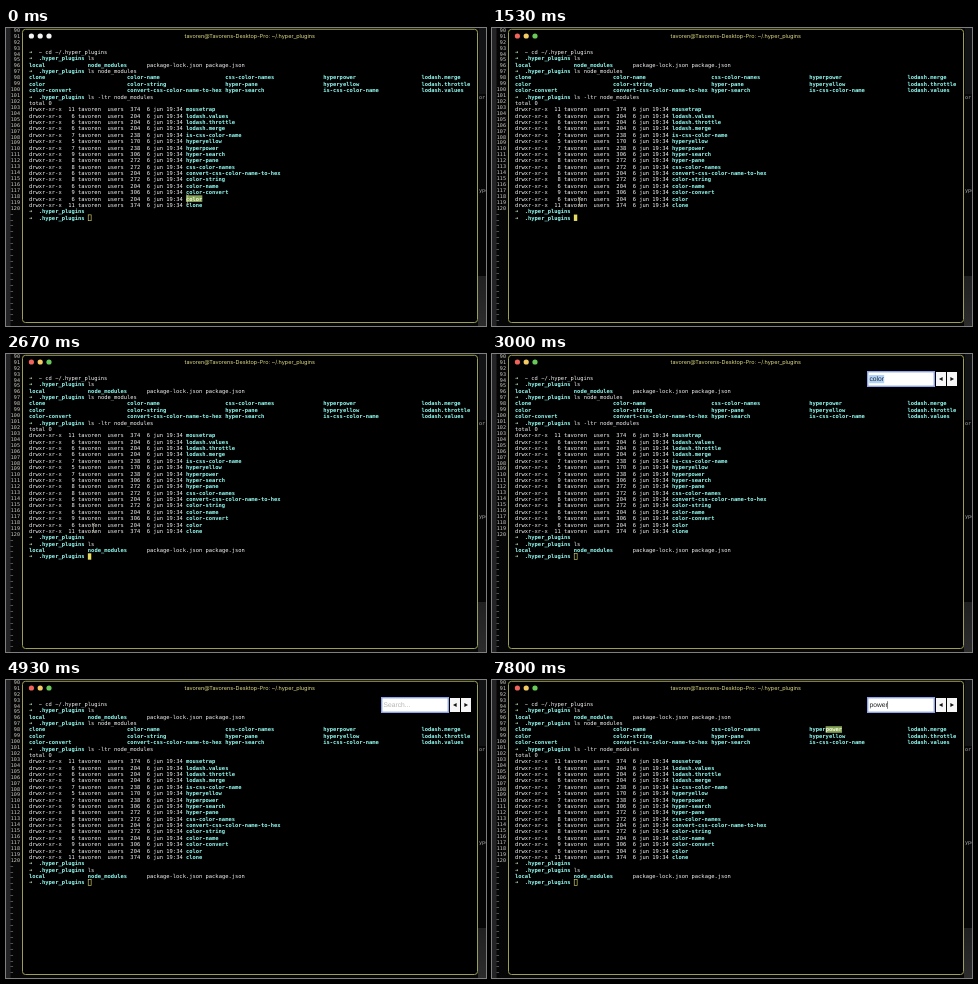
These frames come from a looping animation (480 px wide and 298 px high, 8000 ms). An HTML page with a canvas:

```html
<!DOCTYPE html>
<html lang="en">
<head>
<meta charset="utf-8">
<title>Terminal search</title>
<style>
html, body { margin: 0; width: 100%; height: 100%; overflow: hidden; background: #000; }
canvas { display: block; width: 100vw; height: 100vh; }
</style>
</head>
<body>
<canvas id="stage"></canvas>
<script>
const W = 480, H = 298, LOOP = 8000;
const canvas = document.getElementById('stage');
const ctx = canvas.getContext('2d');

const MONO = '"DejaVu Sans Mono", monospace';
const UI = '"Liberation Sans", Arial, sans-serif';
const TITLE = 'Inter, "Liberation Sans", sans-serif';
const WHITE = '#f4f4f4', CYAN = '#8ffaf0';
const LEFT = 23, TOP = 24, COL = 3.27, ROW = 6.375, SIZE = 5.43;
const USER = 'tavoren', HOST = 'Tavorens-Desktop-Pro', GROUP = 'users';

// Times of the session, in ms
const FOCUS = 600, KEY_L = 2130, KEY_S = 2330, ENTER = 2600, OPEN = 2930, CLEAR = 3390;
const TYPED = [[6870, 'p'], [7330, 'pow'], [7530, 'powe'], [7600, 'power']];
const FOUND = 7800, BLINK = 513;

const modules = [
  ['clone', 'color-name', 'css-color-names', 'hyperpower', 'lodash.merge'],
  ['color', 'color-string', 'hyper-pane', 'hyperyellow', 'lodash.throttle'],
  ['color-convert', 'convert-css-color-name-to-hex', 'hyper-search', 'is-css-color-name', 'lodash.values']
];
const details = [
  [11, 374, 'mousetrap'], [6, 204, 'lodash.values'], [6, 204, 'lodash.throttle'],
  [6, 204, 'lodash.merge'], [7, 238, 'is-css-color-name'], [5, 170, 'hyperyellow'],
  [7, 238, 'hyperpower'], [9, 306, 'hyper-search'], [8, 272, 'hyper-pane'],
  [8, 272, 'css-color-names'], [6, 204, 'convert-css-color-name-to-hex'],
  [8, 272, 'color-string'], [6, 204, 'color-name'], [9, 306, 'color-convert'],
  [6, 204, 'color'], [11, 374, 'clone']
];

const colX = c => LEFT + c * COL;
const rowY = r => TOP + r * ROW;

function rect(x, y, w, h, color) {
  ctx.fillStyle = color;
  ctx.fillRect(x, y, w, h);
}

function text(str, x, y, font, color, align = 'left') {
  ctx.font = font;
  ctx.fillStyle = color;
  ctx.textAlign = align;
  ctx.fillText(str, x, y);
}

// Each word sits on the character grid
function mono(str, col, row, color = WHITE, bold = false) {
  const font = (bold ? 'bold ' : '') + SIZE + 'px ' + MONO;
  for (const m of str.matchAll(/\S+/g)) {
    text(m[0], colX(col + m.index), rowY(row) + 1.9, font, color);
  }
}

function prompt(row, command, dir = '.hyper_plugins') {
  mono('➜', 0, row, '#c4e8ba', true);
  mono(dir, 3, row, dir === '~' ? WHITE : CYAN, dir !== '~');
  mono(command, 4 + dir.length, row);
}

function localFiles(row) {
  mono('local', 0, row, CYAN, true);
  mono('node_modules', 18, row, CYAN, true);
  mono('package-lock.json', 36, row);
  mono('package.json', 54, row);
}

function highlight(str, col, row) {
  rect(colX(col), rowY(row) - 3.3, str.length * COL, 6.6, '#84a254');
  mono(str, col, row, '#f4f8e2', true);
}

function block(col, row, filled) {
  const x = colX(col), y = rowY(row) - 3.2;
  if (filled) return rect(x, y, 3.4, 6.4, '#e6dc62');
  ctx.strokeStyle = '#c3c066';
  ctx.lineWidth = 0.7;
  ctx.strokeRect(x + 0.4, y + 0.3, 2.9, 5.8);
}

function backdrop() {
  rect(0, 0, W, H, '#060606');
  rect(0, 0, 4.5, H, '#242426');
  rect(473, 0, 7, 66, '#121314');
  const shade = ctx.createLinearGradient(0, 248, 0, H);
  shade.addColorStop(0, '#202020');
  shade.addColorStop(1, '#2c2c2c');
  rect(472, 248, 8, 50, shade);
  const font = '5.1px ' + MONO;
  for (let i = 0; i < 50; i++) {
    const y = 3.8 + i * 5.93;
    if (i < 31) text(90 + i, 14, y, font, '#cfcec6', 'right');
    else text('~', 4.2, y, font, '#b2bacb');
  }
  text('or-p', 473, 71, font, '#a8a8a8');
  text('yper', 473, 163.5, font, '#a8a8a8');
}

function frame(focused) {
  ctx.beginPath();
  ctx.roundRect(16.5, 1.3, 455, 293.2, 3);
  ctx.fillStyle = '#000';
  ctx.fill();
  ctx.strokeStyle = '#9c9d56';
  ctx.lineWidth = 1;
  ctx.stroke();
  const lights = focused ? ['#f1645c', '#f3cb62', '#69ca5a'] : Array(3).fill('#f4f4f4');
  lights.forEach((color, i) => {
    ctx.beginPath();
    ctx.arc(25.4 + i * 8.8, 8, 2.6, 0, Math.PI * 2);
    ctx.fillStyle = color;
    ctx.fill();
  });
  text(`${USER}@${HOST}: ~/.hyper_plugins`, 243.8, 10, '5.5px ' + TITLE, '#dfdc84', 'center');
}

function session(t) {
  prompt(0, 'cd ~/.hyper_plugins', '~');
  prompt(1, 'ls');
  localFiles(2);
  prompt(3, 'ls node_modules');
  modules.forEach((line, r) => line.forEach((name, c) => mono(name, c * 30, 4 + r, CYAN, true)));
  prompt(7, 'ls -ltr node_modules');
  mono('total 0', 0, 8);
  details.forEach(([links, size, name], i) => {
    const count = String(links).padStart(2);
    mono(`drwxr-xr-x  ${count} ${USER}  ${GROUP}  ${size}  6 jun 19:34`, 0, 9 + i);
    mono(name, 48, 9 + i, CYAN, true);
  });
  prompt(25, '');

  const typed = t < KEY_L ? '' : t < KEY_S ? 'l' : 'ls';
  prompt(26, typed);
  if (t < ENTER) {
    block(18 + typed.length, 26, t >= FOCUS);
  } else {
    localFiles(27);
    prompt(28, '');
    block(18, 28, t < OPEN);
  }
  if (t < FOCUS) highlight('color', 48, 23);
  if (t >= FOUND) highlight('power', 95, 4);
}

function pointer(t) {
  if (t >= OPEN) return;
  const p = Math.min(1, Math.max(0, (t - 70) / 480));
  const x = 181.5 - 94 * p * p * (3 - 2 * p), y = 171.5 + 2.5 * p;
  ctx.strokeStyle = '#c9c7a4';
  ctx.lineWidth = 0.6;
  ctx.beginPath();
  ctx.moveTo(x, y - 4);
  ctx.lineTo(x, y + 4);
  for (const side of [-1, 1]) {
    ctx.moveTo(x - 1.5, y + side * 4.8);
    ctx.lineTo(x, y + side * 4);
    ctx.lineTo(x + 1.5, y + side * 4.8);
  }
  ctx.stroke();
}

function arrow(x, dir) {
  rect(x, 18, 10, 14, '#f6f6f6');
  ctx.beginPath();
  ctx.moveTo(x + 5 + dir * 2, 25);
  ctx.lineTo(x + 5 - dir * 1.6, 23);
  ctx.lineTo(x + 5 - dir * 1.6, 27);
  ctx.fillStyle = '#111';
  ctx.fill();
}

function searchBox(t) {
  if (t < OPEN) return;
  const font = '6.7px ' + UI, x = 377.5, y = 27.3;
  rect(375, 17, 68, 16, '#8ba5e4');
  rect(376.4, 18.4, 65.2, 13.2, '#fff');
  arrow(444, -1);
  arrow(455, 1);
  if (t < CLEAR) {
    rect(x - 0.3, 21, 15, 8.2, '#b0d3fa');
    text('color', x, y, font, '#222');
    return;
  }
  const step = TYPED.filter(([at]) => t >= at).pop();
  const [since, value] = step || [CLEAR, ''];
  text(value || 'Search...', x, y, font, value ? '#222' : '#b4b4b4');
  if (Math.floor((t - since) / BLINK) % 2 === 0) {
    ctx.font = font;
    rect(x - 0.3 + ctx.measureText(value).width, 21.2, 0.6, 7.6, '#333');
  }
}

function draw(t) {
  const w = Math.round(innerWidth * devicePixelRatio);
  const h = Math.round(innerHeight * devicePixelRatio);
  if (canvas.width !== w || canvas.height !== h) {
    canvas.width = w;
    canvas.height = h;
  }
  ctx.setTransform(w / W, 0, 0, h / H, 0, 0);
  ctx.textRendering = 'geometricPrecision';
  backdrop();
  frame(t >= FOCUS);
  session(t);
  pointer(t);
  searchBox(t);
}

const start = performance.now();
function tick() {
  draw((performance.now() - start) % LOOP);
  requestAnimationFrame(tick);
}
tick();
</script>
</body>
</html>
```
